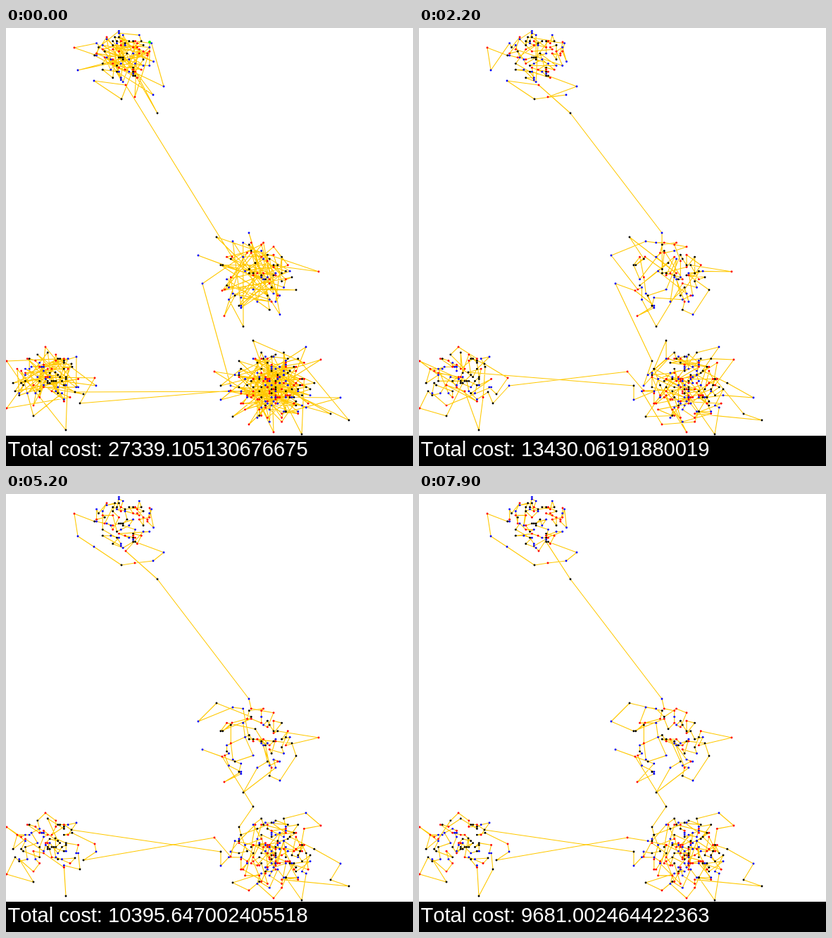
Recreate the animation shown at these times as an HTML page with a canvas. Size 578 px wide and 622 px high, loop 8 s.

```html
<!DOCTYPE html>
<html lang="en">
<head>
<meta charset="utf-8">
<title>Route optimiser</title>
<style>
html, body { margin: 0; width: 100%; height: 100%; overflow: hidden; background: #fff; }
canvas { display: block; }
</style>
</head>
<body>
<canvas id="stage" width="578" height="622"></canvas>
<script>
const ctx = document.getElementById('stage').getContext('2d');
const STEPS = 80, STEP_MS = 100, CELL = 2.89, LINKS = 850, FLOOR = 9400;
const COLORS = ['#000', '#f00', '#00f'];

// Key costs as [step, cost]; between them the excess over FLOOR decays exponentially.
const COSTS = [
  [0, 27339.105130676675], [8, 18473.91910401852], [22, 13430.06191880019],
  [31, 11959.033334813963], [52, 10395.647002405518], [67, 9940.742326958405],
  [79, 9681.002464422363]
];

// Clusters in visiting order: centre, radii, number of stops, a few outlying stops.
const CLUSTERS = [
  { at: [168, 41], size: [46, 36], count: 92,
    rim: [[97, 28], [102, 60], [125, 75], [164, 101], [183, 98], [209, 95], [224, 83]] },
  { at: [355, 351], size: [55, 52], count: 86,
    rim: [[273, 323], [299, 297], [322, 303], [444, 346], [412, 372], [389, 407], [337, 424], [310, 409]] },
  { at: [382, 507], size: [60, 50], count: 88,
    rim: [[426, 453], [447, 471], [475, 525], [487, 557], [461, 548]] },
  { at: [58, 499], size: [50, 42], count: 90,
    rim: [[1, 473], [56, 453], [100, 467], [126, 497], [85, 571], [39, 551], [1, 540]] },
  { at: [376, 513], size: [60, 50], count: 88,
    rim: [[420, 577], [380, 574], [345, 563], [322, 552], [305, 528]] }
];

// Joints between successive clusters: [step, last stop, first stop of the next].
const JOINTS = [
  [[0, [170, 81], [321, 325]], [4, [215, 121], [345, 291]]],
  [[0, [279, 363], [319, 508]], [15, [279, 363], [331, 473]],
   [27, [307, 373], [331, 473]], [42, [307, 373], [351, 444]]],
  [[0, [319, 515], [105, 533]], [15, [296, 488], [128, 508]], [42, [296, 488], [110, 520]]],
  [[0, [98, 517], [334, 516]], [4, [98, 517], [305, 528]],
   [15, [70, 489], [305, 508]], [42, [93, 477], [305, 508]]]
];
const START = [204, 20];

function costAt(step) {
  const i = COSTS.findIndex(([s]) => s >= step);
  const [s1, c1] = COSTS[i];
  if (s1 === step) return c1;
  const [s0, c0] = COSTS[i - 1];
  return FLOOR + (c0 - FLOOR) * ((c1 - FLOOR) / (c0 - FLOOR)) ** ((step - s0) / (s1 - s0));
}

let seed = 20177;
function random() {
  seed = (seed + 0x6D2B79F5) | 0;
  let t = Math.imul(seed ^ (seed >>> 15), 1 | seed);
  t = (t + Math.imul(t ^ (t >>> 7), 61 | t)) ^ t;
  return ((t ^ (t >>> 14)) >>> 0) / 4294967296;
}
const pick = n => Math.floor(random() * n);
const snap = v => (Math.floor(v / CELL) + 0.5) * CELL;
const dist = (a, b) => Math.hypot(a.x - b.x, a.y - b.y);
const lengthOf = chain => chain.reduce((sum, s, i) => i ? sum + dist(s, chain[i - 1]) : 0, 0);

function buildChain({ at, size, count, rim }, index) {
  const stops = [];
  const add = ([x, y]) => {
    const stop = { x, y, color: COLORS[pick(3)] };
    if (!stops.some(s => dist(s, stop) < 2)) stops.push(stop);
  };
  rim.forEach(add);
  for (const [, , first] of JOINTS[index - 1] || []) add(first);
  for (const [, last] of JOINTS[index] || []) add(last);
  if (!index) add(START);
  while (stops.length < count) {
    const angle = random() * Math.PI * 2, r = random() ** 0.7;
    add([snap(at[0] + size[0] * r * Math.cos(angle)), snap(at[1] + size[1] * r * Math.sin(angle))]);
  }
  for (let i = stops.length - 1; i > 0; i--) {
    const j = pick(i + 1);
    [stops[i], stops[j]] = [stops[j], stops[i]];
  }
  return stops;
}

function takeNearest(chain, [x, y]) {
  const away = chain.map(s => dist(s, { x, y }));
  return chain.splice(away.indexOf(Math.min(...away)), 1)[0];
}

// Reverse random stretches that shorten the chain until it is short enough.
function shorten(chain, goal) {
  let length = lengthOf(chain);
  for (let tries = 0; length > goal && tries < 60000; tries++) {
    let i = 1 + pick(chain.length - 2), j = 1 + pick(chain.length - 2);
    if (i === j) continue;
    if (i > j) [i, j] = [j, i];
    const before = chain[i - 1], a = chain[i], b = chain[j], after = chain[j + 1];
    const gain = dist(before, a) + dist(b, after) - dist(before, b) - dist(a, after);
    if (gain <= 1e-6) continue;
    length -= gain;
    for (; i < j; i++, j--) [chain[i], chain[j]] = [chain[j], chain[i]];
  }
}

const chains = CLUSTERS.map(buildChain);
chains[0].unshift(takeNearest(chains[0], START));
let startLengths;
const routes = [];
for (let step = 0; step < STEPS; step++) {
  JOINTS.forEach((joint, i) => {
    for (const [at, last, first] of joint) {
      if (at !== step) continue;
      chains[i].push(takeNearest(chains[i], last));
      chains[i + 1].unshift(takeNearest(chains[i + 1], first));
    }
  });
  startLengths ??= chains.map(lengthOf);
  const ratio = (costAt(step) - LINKS) / (costAt(0) - LINKS);
  chains.forEach((chain, i) => shorten(chain, startLengths[i] * ratio));
  routes.push(chains.flat());
}

function dot(x, y, r, color) {
  ctx.fillStyle = color;
  ctx.beginPath();
  ctx.arc(x, y, r, 0, Math.PI * 2);
  ctx.fill();
}

function draw(step) {
  const route = routes[step];
  ctx.fillStyle = '#fff';
  ctx.fillRect(0, 0, 578, 622);
  ctx.strokeStyle = '#ffc800';
  ctx.lineWidth = 1.1;
  ctx.lineJoin = 'bevel';
  ctx.beginPath();
  for (const s of route) ctx.lineTo(s.x, s.y);
  ctx.stroke();
  for (const s of route) dot(s.x, s.y, 1.45, s.color);
  if (!step) dot(...START, 2, '#0f0');

  ctx.fillStyle = '#000';
  ctx.fillRect(0, 579, 578, 43);
  ctx.fillStyle = '#fff';
  ctx.font = '29.15px "Liberation Sans", Arial, sans-serif';
  ctx.fontKerning = 'none';
  ctx.fillText('Total cost: ' + costAt(step), 2.5, 608);
}

let shown = 0;
function tick(now) {
  const step = Math.floor(now / STEP_MS) % STEPS;
  if (step !== shown) draw(shown = step);
  requestAnimationFrame(tick);
}
draw(0);
requestAnimationFrame(tick);
</script>
</body>
</html>
```
